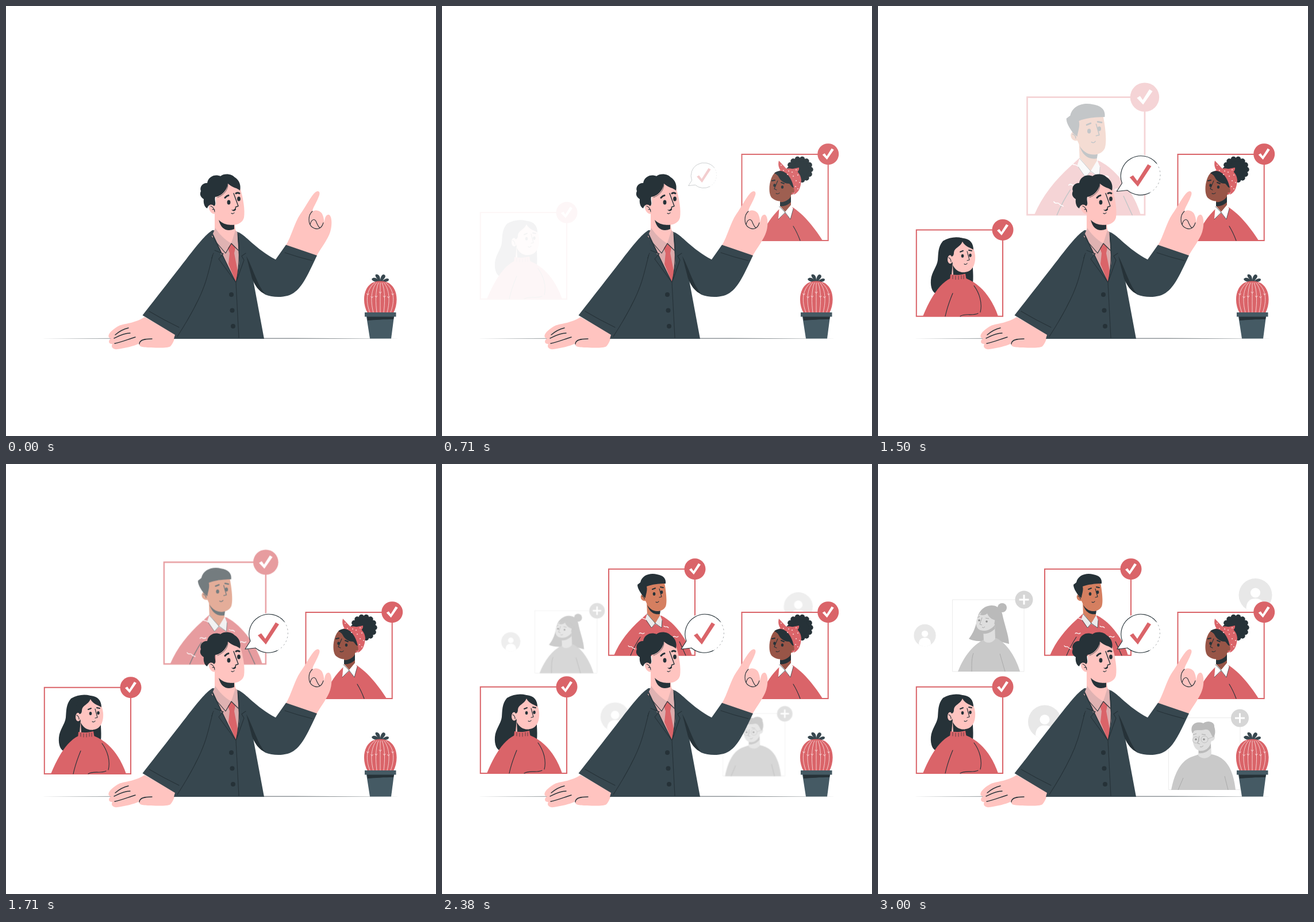
These frames come from a looping animation (748 by 748 pixels, 3.04 s). An HTML page:

```html
<!DOCTYPE html>
<html lang="en">
<head>
<meta charset="utf-8">
<title>Choosing candidates</title>
<style>
html, body { margin: 0; width: 100%; height: 100%; overflow: hidden; background: #fff; }
svg { display: block; width: 100%; height: 100%; }
.ink { fill: #263238; }
.suit { fill: #37474f; }
.red { fill: #da6469; }
.skin { fill: #ffc4c0; }
.brown { fill: #985547; }
.tan { fill: #d57f60; }
.white { fill: #fff; }
.line { fill: none; stroke: #263238; stroke-width: 1.1; stroke-linecap: round; stroke-linejoin: round; }
.thin { stroke-width: .7; }
.bold { stroke-width: 1.4; }
.brow { stroke-width: 2; }
.thick { stroke-width: 3; }
.frame { fill: #fff; stroke: #da6469; stroke-width: 2; }
.pale { fill: #fff; stroke: #ebebeb; stroke-width: 1; }
.g1 { fill: #dedede; } .g2 { fill: #c9c9c9; } .g3 { fill: #bababa; }
.gline { fill: none; stroke: #a6a6a6; stroke-width: .9; }
.chalk { fill: none; stroke: #fff; stroke-width: 1.1; stroke-linecap: round; }
.dots { fill: none; stroke: #f6c5c5; stroke-width: 2.2; stroke-linecap: round; }
</style>
</head>
<body>
<svg viewBox="0 0 748 748">
<defs>
  <g id="badge">
    <circle r="18.5" class="red"/>
    <path class="white" d="M-10 1l4-2.5 3.5 5L6-10l4 2.3L-2 9.5z"/>
  </g>
  <g id="plus">
    <circle r="15.5" fill="#d6d6d6"/>
    <path d="M-8.5 0h17M0-8.5v17" stroke="#fff" stroke-width="3"/>
  </g>
  <g id="avatar">
    <circle r="29" fill="#e8e8e8"/>
    <path class="white" d="M-16 24C-16 11-9 6 0 6S16 11 16 24C7 31-7 31-16 24z"/>
    <circle cy="-4" r="10" fill="#e8e8e8"/>
    <circle cy="-4" r="8.6" class="white"/>
  </g>
</defs>

<g id="crowd">
  <use href="#avatar" transform="translate(81.500 298)scale(.66)"/>
  <use href="#avatar" x="656.500" y="228"/>
  <use href="#avatar" x="290" y="448.500"/>

  <path class="pale" d="M129.500 236h124.500v125h-124.500z"/>
  <circle cx="216" cy="250" r="8" class="g3"/>
  <path class="g3" d="M174 264C180 244 209 238 216 260C220 280 227 296 228 313L213 309L186 309C176 308 164 308 158 304C166 294 170 284 174 264z"/>
  <path class="g2" d="M139 361C149 335 165 315 183 306L206 303C226 313 240 338 247 361z"/>
  <path class="g1" d="M183 288L203 278L204 304C198 313 187 312 184 307z"/>
  <path class="g3" d="M183 289C192 290 199 286 203 280V287C196 294 188 296 183 295z"/>
  <path class="g1" d="M178 259C169 270 168 285 178 289C191 293 202 285 203 274C205 266 200 258 191 257z"/>
  <path class="g3" d="M177 262C186 251 199 253 211 273C200 272 193 268 190 260C187 263 182 264 177 262z"/>
  <path class="gline" d="M181 267L177 279L181 280M181 284q3 2 5-1M173 267l4-2M187 268l6 1M163 361C163 345 163 337 166 329M212 330L221 361"/>
  <circle cx="176" cy="272" r="1.800" fill="#929292"/><circle cx="189" cy="274" r="1.800" fill="#929292"/>
  <use href="#plus" x="254" y="236"/>

  <path class="pale" d="M505.500 441.500h124.500v125h-124.500z"/>
  <path class="g2" d="M510 567C515 541 525 518 544 510L558 505H580C608 510 618 534 622 567z"/>
  <path class="g1" d="M557 495L579 484L580 505C574 514 562 513 557 507z"/>
  <path class="g3" d="M558 498C568 500 576 492 579 486V494C572 502 564 504 558 503z"/>
  <path class="g1" d="M549 462C546 476 546 496 560 499C572 500 578 491 580 482C588 482 588 468 580 470L578 460z"/>
  <path class="g3" d="M547 469C541 454 553 446 566 451C574 445 586 449 585 457C588 466 586 473 583 476L580 471C577 464 574 461 569 462C561 464 554 462 550 464z"/>
  <path class="gline" d="M559 473L556 486L560 487M560 492q4 1 6-2M548 471l6-2M563 470l7 1M522 567L531 546M603 543L609 567"/>
  <g class="gline" stroke-opacity=".6"><circle cx="553" cy="480" r="5.500"/><circle cx="568" cy="479" r="6"/><path d="M574 478L582 475"/></g>
  <circle cx="553" cy="479" r="1.800" fill="#929292"/><circle cx="567" cy="479" r="1.800" fill="#929292"/>
  <use href="#plus" x="629.500" y="442"/>
</g>

<g id="topCard">
  <path class="frame" d="M290 182.700h150v150H290z"/>
  <path class="red" d="M299 333C309 309 326 288 345 271L357 260L382 264C406 276 428 308 435 333z"/>
  <path class="tan" d="M356 238L379 252V264L370 278L357 264z"/>
  <path class="ink" d="M357 245C362 254 372 257 380 255L379 261C368 263 360 256 357 245z"/>
  <path fill="#ebebeb" d="M357 260L354 269L364.500 285L371 278L382 285L383 272L379.500 263L371 277z"/>
  <path class="line thin" d="M357 261L371 277L364.500 285L354 270M371 277L382 285L383 272"/>
  <path class="tan" d="M353 211L387 207C390 222 392 241 389 248C385 256 374 258 366 254C360 250 356 243 354 238C346 240 342 228 350 226z"/>
  <path class="ink" d="M349 229C344 222 340 216 340 210L345 206C348 193 362 189 374 192C386 194 390 200 389 208C377 208 363 210 356 213C358 220 354 228 354 233z"/>
  <ellipse cx="369" cy="226" rx="2.300" ry="3" class="ink"/><ellipse cx="382" cy="223" rx="2.300" ry="3" class="ink"/>
  <path class="line" d="M378 217L382 231L378 232M372 240q3 2 5-1M348 230q4 1 4 5"/>
  <path class="line brow" d="M366 218l5-2M380 214l5 1"/>
  <path class="line" d="M328 333C333 321 339 310 345 301M413 309L424 333"/>
  <path class="chalk" d="M324 316c2 4 5 0 7 3s4 1 5 3M346 266c3 5 5 1 9 5M343 295c3-4 5 3 9-1M386 282c3 3 6-1 8 3M402 301c3-4 5 3 9-1"/>
  <use href="#badge" x="440" y="182.700"/>
</g>

<g id="leftCard">
  <path class="frame" d="M66.800 387.700h150.200v150.300h-150.200z"/>
  <path class="ink" d="M113 407C104 417 105 430 104 440C103 451 93 461 92 475C91 488 95 497 102 499C107 499 111 497 114 493L165 480C167 465 163 447 165 420C160 402 136 394 113 407z"/>
  <path class="red" d="M78 538C91 506 107 481 126 472H153C181 483 199 509 209 538z"/>
  <path class="skin" d="M130 444H152V466H128z"/>
  <path class="ink" d="M130 449C136 460 145 463 153 461V467H131z"/>
  <path class="red" d="M126 465C135 467 144 466 152 464L154 476H125z"/>
  <path class="line thin" d="M130 467v6M135 468v6M140 468v6M145 467v6M149 467v6"/>
  <path class="skin" d="M131 414C128 430 128 440 130 446C134 458 145 462 153 461C166 459 170 445 169 432C168 418 158 406 148 405z"/>
  <ellipse cx="125.500" cy="439" rx="4.500" ry="7.500" class="skin"/>
  <path class="ink" d="M122 434C118 418 128 401 147 402C160 403 166 411 166 422C158 418 150 415 147 408C143 418 133 418 132 427C132 432 130 434 128 434C126 430 123 431 122 434z"/>
  <ellipse cx="147" cy="433" rx="2.300" ry="3" class="ink"/><ellipse cx="160.500" cy="432" rx="2.300" ry="3" class="ink"/>
  <path class="line" d="M155 425L159 440L155 441M150 447q3 2 5-1M123 436q4 2 4 7M130 498C125 510 120 524 117 538M167 485C176 497 182 515 178 531M143 538C152 532 164 538 174 533"/>
  <path class="line brow" d="M143 426l5-2M158 423l5 1"/>
  <use href="#badge" x="217" y="387.700"/>
</g>

<g id="rightCard">
  <path class="frame" d="M521.500 258H671.700V408H521.500z"/>
  <g id="puff" class="ink"></g>
  <path class="red" d="M550 408C562 382 576 363 587 353L608 349C630 362 650 389 662 408z"/>
  <path class="brown" d="M588 336L607 328V349L597 362L588 352z"/>
  <path class="ink" d="M588 341C596 342 604 337 607 331V341C601 347 594 349 588 348z"/>
  <path class="white" d="M587 347L585 371L597 360L606 371L611 353L607 346L597 358z"/>
  <path class="line thin" d="M587 349L597 359L585 371M597 359L606 371L611 353"/>
  <path class="brown" d="M580 289C569 298 566 326 574 334C585 343 600 341 608 328C615 327 615 314 610 312L605 291z"/>
  <path class="red" d="M584 288C604 276 624 285 625 303C624 317 620 325 612 328C614 321 612 316 610 311z"/>
  <path class="ink" d="M578 291C586 283 605 285 612 316C608 316 607 311 604 309C595 309 589 304 586 298C584 294 581 292 578 291z"/>
  <path class="red" d="M599 283L586 269C584 276 586 282 589 286zM606 284L621 281C622 287 617 291 611 292z"/>
  <path class="dots" d="M594 286h.1M603 287h.1M601 293h.1M611 296h.1M619 294h.1M616 304h.1M622 307h.1M615 314h.1M619 318h.1M590 277h.1M616 285h.1M609 289h.1"/>
  <circle cx="610" cy="326" r="1.800" class="red"/>
  <ellipse cx="578.500" cy="312" rx="2.200" ry="2.800" class="ink"/><ellipse cx="592" cy="315" rx="2.200" ry="2.800" class="ink"/>
  <path class="line" d="M584 304L578 318L582 320M581 326q4 2 6-1M611 383C616 391 620 400 623 408"/>
  <path class="line brow" d="M574 304l5-1M590 307l5 2"/>
  <use href="#badge" x="671.700" y="257.700"/>
</g>

<g id="bubble">
  <path class="white" d="M416 322L425 308A34.500 34.500 0 1 1 434 320z"/>
  <path class="line" d="M484 274A34.500 34.500 0 0 0 425 308L416 322L434 320A34.500 34.500 0 0 0 472 324.500"/>
  <path class="line" style="stroke-width:.4;stroke-dasharray:2 5" d="M484 274A34.500 34.500 0 0 1 472 324.500"/>
  <path class="red" d="M438 298L444 294.500L451 304L469 275.500L475 279L452 314z"/>
</g>

<path class="ink" d="M60 578.200L240 577.700H500L686 578.200L500 578.600H240z"/>

<g id="plant">
  <path class="suit" d="M651 480C640 481 634 476 637 474C640 471 646 474 648 477C640 469 642 466 646 467C650 468 651 473 651 477C652 470 655 465 659 468C662 471 657 475 655 478C660 473 666 473 666 476C666 480 657 481 651 480z"/>
  <path class="red" d="M629 534C617 513 622 478 651 478.500C681 478 685 513 674 534z"/>
  <g id="ribs" fill="none" stroke="#f9dada" stroke-width=".9"></g>
  <path fill="#455a64" d="M627 540H675L670 578.500H633z"/>
  <path class="ink" d="M628 540H675L674 545C658 545 642 546 629 547z"/>
  <path fill="#455a64" d="M624 533h54.500v7.500H624z"/>
</g>

<g id="host">
  <path class="skin" d="M486 418C497 400 502 376 512 362C522 348 530 331 538 324C543 320 547 323 545 329C541 341 534 350 533 357C541 353 549 357 551 364C553 369 553 373 554 377C554 368 557 362 562 363C568 367 567 384 564 393C560 406 548 421 540 435z"/>
  <path class="line" d="M533 357C525 364 525 379 533 385C541 390 549 388 552 377M529 380C531 372 536 369 539 374C541 379 543 384 546 386"/>
  <path class="suit" d="M403 393C418 399 433 422 469 441L487 415.500L541 434C528 461 517 487 503 497C491 508 466 508 451 502C440 495 432 484 425 468z"/>
  <path class="line" d="M485 429Q508 437 533 443"/>
  <path class="skin" d="M241 541C224 552 207 552 197 556C187 561 177 570 178.500 575C179 578 182 578 183 578C177 582 178 588 185 588C182 593 186 598 194 597C207 595 222 592 232 587C230 593 238 594 252 594C267 595 281 595 286 592C290 588 293 580 296 571z"/>
  <path class="line bold" d="M190 572C197 566 204 562 213 560M188 578C196 574 205 569 216 569M189 587C201 585 214 579 225 576M232 588C232 580 243 579 254 579"/>
  <path class="suit" d="M359 390C341 402 330 420 237.500 538L294 572L292 579H449L430 477L403 393z"/>
  <path class="ink" d="M418 435C428 452 438 488 451 501C442 498 434 489 428 474z"/>
  <path class="line" d="M360 432C352 462 349 481 335 510C324 533 311 555 298 575M249 531Q274 546 301 559"/>
  <path d="M364 387L358 401L400 481L406 446L402 392z" fill="#dcaaab"/>
  <path class="skin" d="M363 352V387C372 399 381 409 391 414L400 394L397 374z"/>
  <path d="M364 386L358 402L382 430L392 413L404 426L402 393L399 390L392 413C379 406 370 395 364 386z" fill="#dfb2b2"/>
  <path class="red" d="M386 421L392 413L399 420L397 430L404 466L400 481L387 449L389 430z"/>
  <path class="line" d="M358 402L382 430L392 413L404 425"/>
  <path class="suit" d="M359 394L399.500 481L369 438L376 431L362 426zM403 395L418 431L412 437L415 442L400 481L406 452z"/>
  <path class="line" d="M359 398L400 481L370 440L378 431L363 425M404 396C406 420 407 452 400 481L414 442L410 435L417 430M400 481L405 577"/>
  <path class="line" d="M361 430L357 440" style="stroke-dasharray:1 3"/>
  <g class="ink"><circle cx="392" cy="502" r="4"/><circle cx="393.500" cy="529.500" r="4"/><circle cx="395" cy="557" r="4"/></g>
  <path class="ink" d="M370 372C378 380 388 382 397 380V388C385 393 374 389 370 372z"/>
  <path class="skin" d="M365 326L386 309L407 316C413 335 416 355 414 368C411 380 396 383 386 379C376 376 369 369 365 361C356 365 348 347 356 344C361 343 363 345 365 346z"/>
  <path class="ink" d="M350 352C345 350 343 342 344 336C337 331 337 327 339 322C336 314 343 307 350 308C352 296 364 292 373 296C380 290 393 292 398 298C406 303 409 312 407 321C402 316 395 317 386 309C385 320 375 331 364 332C362 338 367 345 362 348C357 343 352 346 350 352z"/>
  <path class="line thin" d="M386 311C386 320 379 329 368 333"/>
  <ellipse cx="387.500" cy="341.500" rx="2.900" ry="4" class="ink"/><ellipse cx="405" cy="335.500" rx="2.900" ry="4" class="ink"/>
  <path class="line thick" d="M381 333.500Q384 330 387 329.500M400 326Q403 324 406 326"/>
  <path class="line bold" d="M396 326L404 348L399 350"/>
  <path class="ink" d="M392 354C396 356 398 353 400 349.500L400 354C398 358 394 357 392 354z"/>
  <path class="line" d="M392 360.500q3 2 5-1M356 348q6 2 7 10M359 354q3-1 4 1"/>
</g>
</svg>
<script>
const LOOP = 3040, SPAN = 1216, HOLD = 170;
const $ = id => document.getElementById(id);

// Round hair bun and cactus ribs
let puff = '<circle cx="622.5" cy="284.5" r="20"/>';
for (let i = 0; i < 14; i++) {
  const a = i * Math.PI / 7;
  puff += `<circle cx="${622.5 + 18.5 * Math.cos(a)}" cy="${284.5 + 18.5 * Math.sin(a)}" r="4.7"/>`;
}
$('puff').innerHTML = puff;

let ribs = '';
for (let k = -3; k <= 3; k++) {
  const x = 651 + k * 7.2, y = 499 + (k * k * 7) % 20;
  ribs += `<path d="M${651 + k * 3} 481C${651 + k * 9} 495 ${651 + k * 8} 518 ${651 + k * 6} 533"/>` +
    `<path d="M${x - 2} ${y - 2}l2 3 2-3"/>`;
}
$('ribs').innerHTML = ribs;

// Cubic-bezier easing with overshoot
const bez = (a, b, u) => 3 * (1 - u) * u * ((1 - u) * a + u * b) + u ** 3;
function ease(x) {
  if (x <= 0) return 0;
  if (x >= 1) return 1;
  let lo = 0, hi = 1;
  for (let i = 0; i < 24; i++) {
    const mid = (lo + hi) / 2;
    if (bez(.36, .5, mid) < x) lo = mid; else hi = mid;
  }
  return bez(-.01, 1.38, lo);
}

const zoom = (x, y, from) => p =>
  `translate(${x} ${y})scale(${from + (1 - from) * p})translate(${-x} ${-y})`;

const parts = [
  ['rightCard', -50, () => ''],
  ['bubble', 350, zoom(453, 294.5, .5)],
  ['leftCard', 558, p => `translate(0 ${30 * (p - 1)})`],
  ['topCard', 1166, zoom(374, 249, 1.5)],
  ['crowd', 1776, zoom(374, 383, .5)]
].map(([id, start, move]) => ({ el: $(id), start, move }));

function draw(now) {
  const t = now % LOOP;
  for (const { el, start, move } of parts) {
    const p = t < HOLD ? 0 : ease((t - start) / SPAN);
    el.setAttribute('opacity', Math.min(1, Math.max(0, p)));
    el.setAttribute('transform', move(p));
  }
}

const begin = performance.now();
function tick() {
  draw(performance.now() - begin);
  requestAnimationFrame(tick);
}
tick();
</script>
</body>
</html>
```
